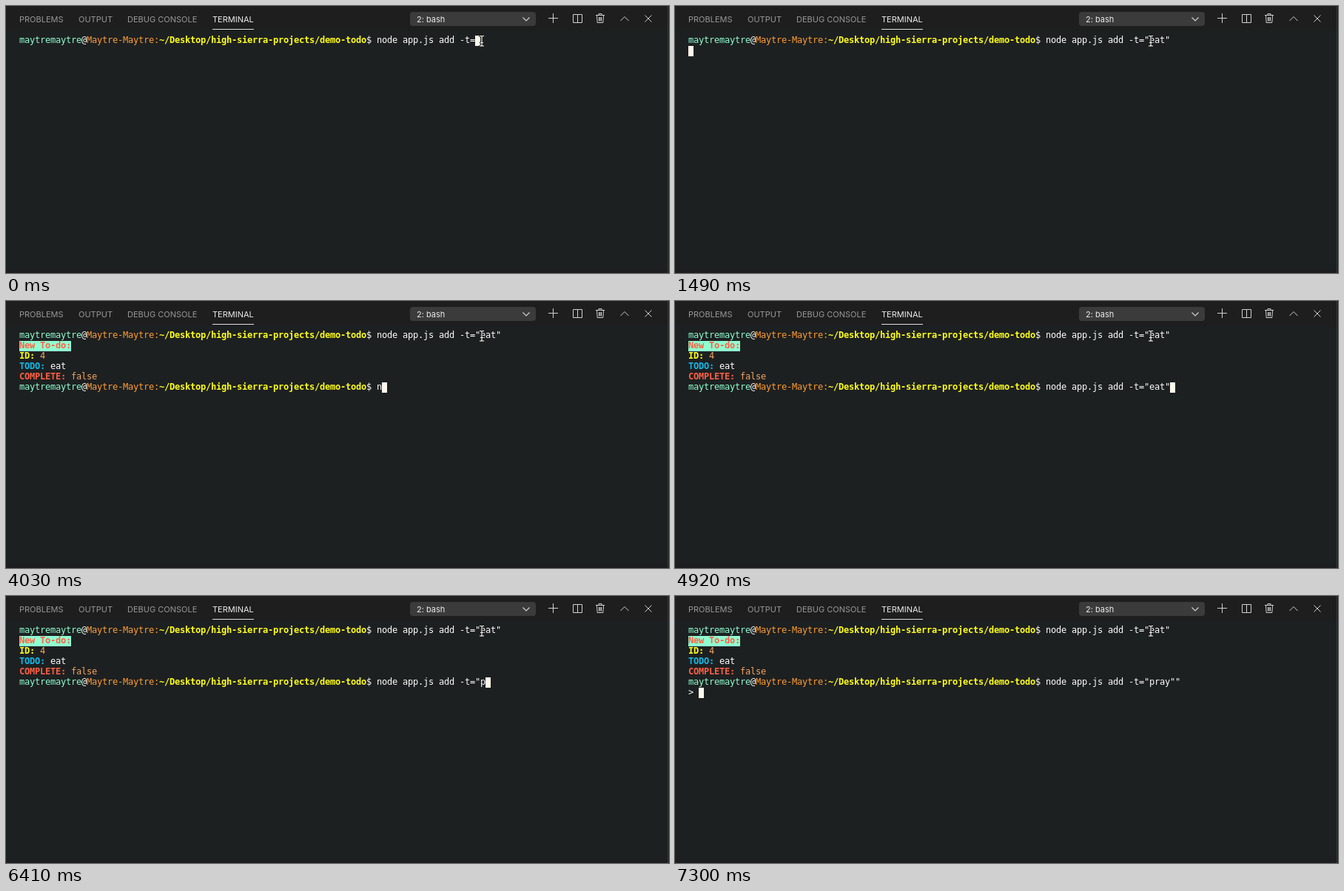
These frames come from a looping animation (896 px wide and 361 px high, 8 s). An HTML page:

```html
<!DOCTYPE html>
<html lang="en">
<head>
<meta charset="utf-8">
<title>Terminal to-do demo</title>
<style>
  html, body { margin: 0; width: 100%; height: 100%; overflow: hidden; background: #1d2021; }
  svg { display: block; width: 100vw; height: 100vh; }
  .ui { font: 11px Inter, "Open Sans", sans-serif; fill: #969896; }
  .ui .on { fill: #ececec; }
  .term { font: 12px "DejaVu Sans Mono", "Liberation Mono", monospace; fill: #fff; }
  .bold { font-weight: 700; }
  .icon { fill: none; stroke: #d0d0d0; stroke-width: 1; }
</style>
</head>
<body>
<svg viewBox="0 0 896 361" preserveAspectRatio="none">
  <rect width="896" height="361" fill="#1d2021"/>
  <rect width="896" height="34" fill="#1e1e1e"/>
  <rect y="356" width="896" height="5" fill="#1b1d1e"/>
  <rect x="894" width="1" height="361" fill="#35393a"/>

  <g class="ui">
    <text x="18" y="22">PROBLEMS</text>
    <text x="98" y="22">OUTPUT</text>
    <text x="164" y="22">DEBUG CONSOLE</text>
    <text x="279" y="22" class="on">TERMINAL</text>
    <rect x="279" y="31" width="56" height="1" fill="#e0e0e0"/>
    <rect x="546" y="8" width="170" height="19" rx="4" fill="#3b3b3b"/>
    <text id="shell" x="555" y="22" class="on"></text>
  </g>

  <g class="icon">
    <path d="M698.5 15.5l4.5 4.5 4.5-4.5" stroke-width="1.2"/>
    <path d="M739.5 10v13M733 16.5h13"/>
    <path d="M766.500 11.500h12v11h-12zM772.500 11.500v11"/>
    <path d="M797 12.500h12M801 12.500v-2h4v2M798.500 12.500l.7 10h7.600l.7-10M801.500 15v5.500M803 15v5.500M804.500 15v5.500"/>
    <path d="M830.500 20l5.500-5.500 5.500 5.500"/>
    <path d="M863.500 12.500l9 9M872.500 12.500l-9 9"/>
  </g>

  <g id="term" class="term">
    <g id="first"></g>
    <g id="result"></g>
    <g id="second"></g>
    <g id="more"></g>
    <rect id="caret" width="7" height="14" fill="#fff8ec"/>
  </g>

  <g fill="none" stroke-linecap="square">
    <path id="beam" d="M640.500 40.500h1.200q1.300 0 1.300 1.500v10.500q0 1.500-1.300 1.500h-1.200M645.500 40.500h-1.200q-1.300 0-1.300 1.500M645.500 54h-1.200q-1.300 0-1.300-1.500M641.500 49.500h3" stroke="#1b1b1b" stroke-width="2.600"/>
    <use href="#beam" id="beamCore"/>
    <path d="M640.500 40.500h1.200q1.300 0 1.300 1.500v10.500q0 1.500-1.300 1.500h-1.200M645.500 40.500h-1.200q-1.300 0-1.300 1.500M645.500 54h-1.200q-1.300 0-1.300-1.500M641.500 49.500h3" stroke="#fff" stroke-width="1.100"/>
  </g>
</svg>
<script>
const NS = 'http://www.w3.org/2000/svg';
const LOOP = 8000, LEFT = 18, TOP = 40, CELL = 7, ROW = 14;
const MINT = '#8fffd2', ORANGE = '#ff9d33', YELLOW = '#ffff1a', SAND = '#f4a460',
      TOMATO = '#ff5f43', SKY = '#14b8e6', WHITE = '#ffffff';
const $ = id => document.getElementById(id);
document.getElementById('beamCore').remove();

const prompt = [
  ['maytremaytre', MINT], ['@', WHITE], ['Maytre-Maytre:', ORANGE],
  ['~/Desktop/high-sierra-projects/demo-todo', YELLOW, true], ['$', WHITE]
];
const PROMPT_COLS = prompt.reduce((n, run) => n + run[0].length, 1);
const CMD = 'node app.js add -t=';

// [time, text after the prompt]
const firstKeys = [
  [0, CMD], [300, CMD + '"'], [740, CMD + '"ea'], [890, CMD + '"eat'], [1190, CMD + '"eat"']
];
const secondKeys = [
  [1640, ''], [4030, 'n'], [4470, ''], [4920, CMD + '"eat"'],
  [5520, CMD + '"eat'], [5820, CMD + '"ea'], [5970, CMD + '"e'], [6110, CMD + '"'],
  [6410, CMD + '"p'], [6560, CMD + '"pra'], [6700, CMD + '"pray'],
  [7000, CMD + '"pray"'], [7300, CMD + '"pray""']
];
const ENTER = 1490, OUTPUT = 1640, IDLE = 1790, CONTINUE = 7300;

function add(parent, tag, attrs) {
  const el = document.createElementNS(NS, tag);
  for (const key in attrs) el.setAttribute(key, attrs[key]);
  return parent.appendChild(el);
}

// Each glyph sits on the terminal's cell grid.
function write(parent, row, col, text, fill = WHITE, bold = false) {
  const x = Array.from(text, (_, i) => LEFT + (col + i) * CELL).join(' ');
  const el = add(parent, 'text', { x, y: TOP + row * ROW + 10, fill });
  if (bold) el.setAttribute('class', 'bold');
  el.textContent = text;
  return el;
}

function writeRuns(parent, row, runs) {
  let col = 0;
  for (const [text, fill, bold] of runs) {
    write(parent, row, col, text, fill, bold);
    col += text.length;
  }
}

function field(row, label, fill, value, valueFill) {
  write($('result'), row, 0, label, fill, true);
  write($('result'), row, label.length + 1, value, valueFill);
}

function commandLine(id, row) {
  writeRuns($(id), row, prompt);
  return write($(id), row, PROMPT_COLS, CMD + '"pray""');
}

const firstText = commandLine('first', 0);
add($('result'), 'rect', { x: LEFT, y: TOP + ROW, width: 10 * CELL, height: ROW, fill: MINT });
write($('result'), 1, 0, 'New To-do:', TOMATO, true);
field(2, 'ID:', YELLOW, '4', SAND);
field(3, 'TODO:', SKY, 'eat', WHITE);
field(4, 'COMPLETE:', TOMATO, 'false', SAND);
const secondText = commandLine('second', 5);
write($('more'), 6, 0, '>');

function typed(keys, t) {
  let text = '';
  for (const [at, value] of keys) if (t >= at) text = value;
  return text;
}

function show(id, visible) {
  $(id).setAttribute('visibility', visible ? 'visible' : 'hidden');
}

function setText(el, text) {
  if (el.textContent !== text) el.textContent = text;
}

function caretAt(t, a, b) {
  if (t < ENTER) return [0, PROMPT_COLS + a.length];
  if (t < OUTPUT) return [1, 0];
  if (t < CONTINUE) return [5, PROMPT_COLS + b.length];
  return [6, 2];
}

function draw(t) {
  const a = typed(firstKeys, t), b = typed(secondKeys, t);
  setText(firstText, a);
  setText(secondText, b);
  setText($('shell'), t >= OUTPUT && t < IDLE ? '2: node' : '2: bash');
  show('result', t >= OUTPUT);
  show('second', t >= OUTPUT);
  show('more', t >= CONTINUE);
  const [row, col] = caretAt(t, a, b);
  $('caret').setAttribute('x', LEFT + col * CELL);
  $('caret').setAttribute('y', TOP + row * ROW);
}

const start = performance.now();
function tick() {
  draw((performance.now() - start) % LOOP);
  requestAnimationFrame(tick);
}
tick();
</script>
</body>
</html>
```
